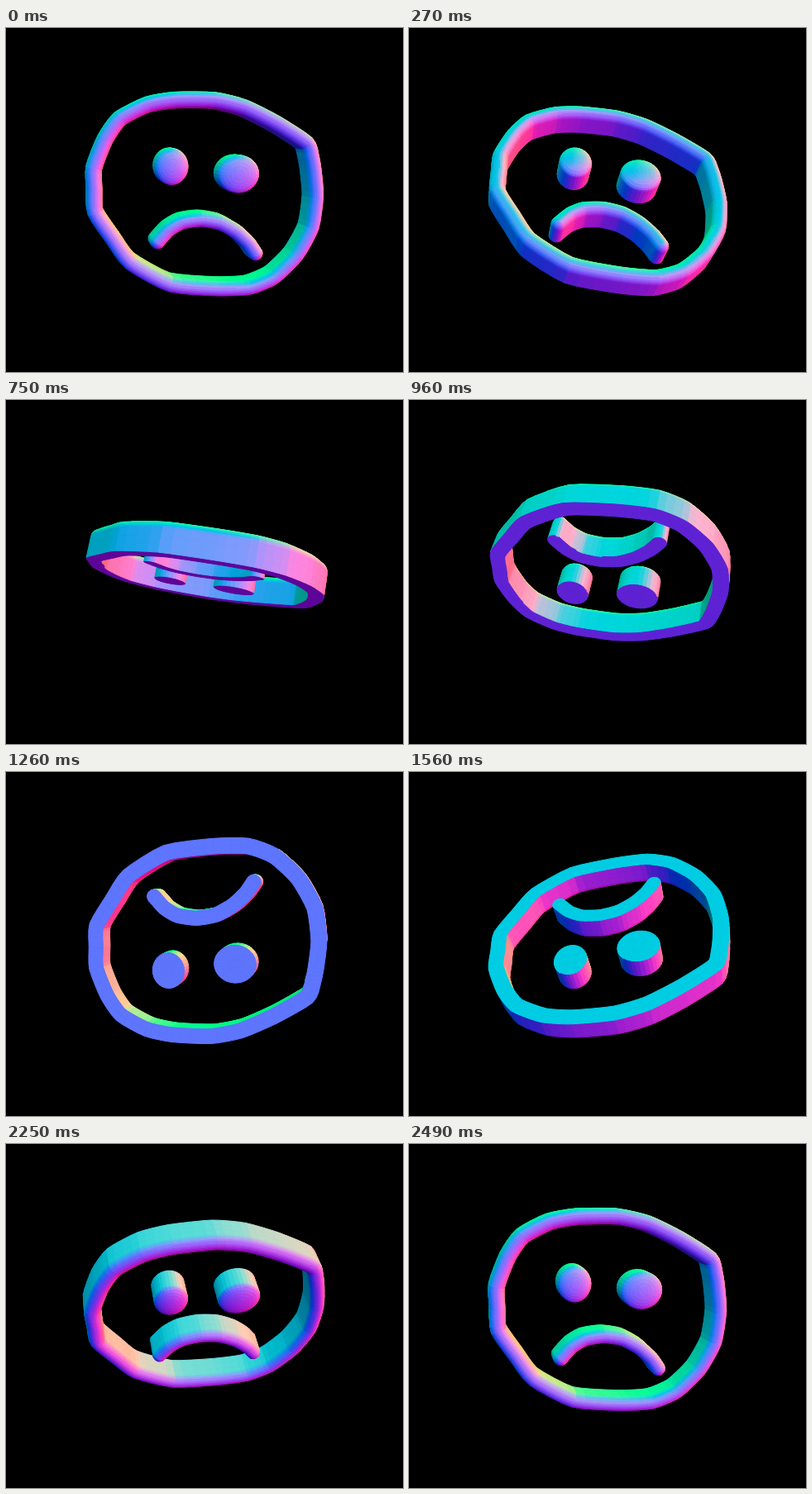
Recreate the animation shown at these times as an HTML page with a canvas. Size 480 by 416 pixels, loop 2.52 s.

```html
<!DOCTYPE html>
<html>
<head>
<meta charset="utf-8">
<style>
html, body { margin: 0; height: 100%; overflow: hidden; background: #000; }
canvas { display: block; }
</style>
</head>
<body>
<canvas id="stage" width="480" height="416"></canvas>
<script>
const ctx = document.getElementById('stage').getContext('2d');
const LOOP = 2520, STEP = 30;
const CENTER_X = 241, CENTER_Y = 203, CAMERA = 850;
const FRONT = 20, BACK = -16, BEVEL = 9, YAW = Math.PI / 18, START = -5;
const clamp = v => Math.max(0, Math.min(1, v));

// Stage position of the front face -> flat model coordinates, y up
function toModel([px, py]) {
  const u = px - 243, scale = 1.003 + 0.0002 * u;
  return [u * scale, (201 - py) * scale];
}

const headPoints = [
  [107, 165], [121, 131], [139, 107], [172, 91], [205, 86], [252, 87], [288, 96],
  [326, 115], [363, 139], [369, 156], [372, 172], [375, 203], [370, 240], [352, 273],
  [325, 299], [295, 311], [255, 312], [198, 306], [150, 279], [129, 250], [108, 218], [107, 191]
].map(toModel);
const mouthPoints = [
  [183, 254], [196, 240], [212, 231], [235, 228], [258, 232], [278, 243], [293, 257], [302, 270]
].map(toModel);

// Smooth path through the points, with a gentle tension
function smooth(points, closed, parts = 4) {
  const n = points.length, path = [];
  const at = i => points[closed ? (i + n) % n : Math.max(0, Math.min(n - 1, i))];
  for (let i = 0; i < (closed ? n : n - 1); i++) {
    for (let k = 0; k < parts; k++) {
      const t = k / parts, t2 = t * t, t3 = t2 * t;
      path.push([0, 1].map(c => {
        const a = at(i)[c], b = at(i + 1)[c];
        const ma = 0.3 * (b - at(i - 1)[c]), mb = 0.3 * (at(i + 2)[c] - a);
        return (2 * t3 - 3 * t2 + 1) * a + (t3 - 2 * t2 + t) * ma
          + (3 * t2 - 2 * t3) * b + (t3 - t2) * mb;
      }));
    }
  }
  if (!closed) path.push(points[n - 1]);
  return path;
}

// Each station is a center point plus a sideways vector, left of travel
function stations(path, closed, width) {
  const n = path.length;
  return path.map(([x, y], i) => {
    const a = path[closed ? (i + n - 1) % n : Math.max(0, i - 1)];
    const b = path[closed ? (i + 1) % n : Math.min(n - 1, i + 1)];
    const dx = b[0] - a[0], dy = b[1] - a[1], k = width / Math.hypot(dx, dy);
    return [x, y, -dy * k, dx * k];
  });
}

function roundEnd([x, y, nx, ny]) {
  return Array.from({ length: 9 }, (_, i) => {
    const a = -Math.PI * (i + 1) / 10, c = Math.cos(a), s = Math.sin(a);
    return [x, y, nx * c - ny * s, nx * s + ny * c];
  });
}

function eye(px, py, rx, ry) {
  const [x, y] = toModel([px, py]);
  return Array.from({ length: 32 }, (_, i) => {
    const a = -i * Math.PI / 16;
    return [x, y, rx * Math.cos(a), ry * Math.sin(a)];
  });
}

// Half profile from the flat back, up the wall and over the rounded front
const profile = [[0, BACK], [1, BACK]];
const shoulder = FRONT - BEVEL;
for (let i = 1; i < 3; i++) profile.push([1, BACK + (shoulder - BACK) * i / 3]);
for (let i = 0; i <= 7; i++) {
  const a = i * Math.PI / 14;
  profile.push([Math.cos(a), shoulder + BEVEL * Math.sin(a)]);
}

const sweep = list => list.map(([x, y, nx, ny]) =>
  profile.map(([f, z]) => [x + nx * f, y + ny * f, z]));

const headPath = smooth(headPoints, true);
const mouthPath = smooth(mouthPoints, false);
const upper = stations(mouthPath, false, 8.5);
const lower = stations(mouthPath.slice().reverse(), false, 8.5);
const surfaces = [
  stations(headPath, true, 9),
  stations(headPath.slice().reverse(), true, 9),
  [...upper, ...roundEnd(upper[upper.length - 1]), ...lower, ...roundEnd(lower[lower.length - 1])],
  eye(200.5, 164.5, 19.5, 21.5),
  eye(281, 174.5, 25, 22.5)
].map(sweep);

function colorOf([x, y, z], degrees) {
  const fade = 1 - 0.7 * Math.exp(-(((degrees - 316) / 25) ** 2));
  const cut = fade * clamp((y - 0.25) / 0.3) * Math.max(0, 1 - 1.5 * Math.abs(x));
  const channel = v => Math.round(255 * clamp(v));
  return `rgb(${channel((1 + 1.5 * x - cut) / 2)},${channel((1 + y) / 2)},${channel((1 + z) / 2)})`;
}

const minus = (a, b) => [a[0] - b[0], a[1] - b[1], a[2] - b[2]];
const cross = (a, b) => [
  a[1] * b[2] - a[2] * b[1], a[2] * b[0] - a[0] * b[2], a[0] * b[1] - a[1] * b[0]
];

function draw(time) {
  const degrees = START + 360 * time / LOOP, tilt = degrees * Math.PI / 180;
  const cy = Math.cos(YAW), sy = Math.sin(YAW), ct = Math.cos(tilt), st = Math.sin(tilt);
  const turn = ([x, y, z]) => {
    const depth = z * cy - x * sy;
    return [x * cy + z * sy, y * ct + depth * st, depth * ct - y * st];
  };

  const faces = [];
  for (const surface of surfaces) {
    const rows = surface.map(row => row.map(turn));
    rows.forEach((row, i) => {
      const next = rows[(i + 1) % rows.length];
      for (let j = 0; j + 1 < row.length; j++) {
        const quad = [row[j], next[j], next[j + 1], row[j + 1]];
        const n = cross(minus(quad[3], quad[1]), minus(quad[2], quad[0]));
        const size = Math.hypot(...n);
        const p = quad[0];
        if (size < 1e-6 || n[2] * (CAMERA - p[2]) - n[0] * p[0] - n[1] * p[1] <= 0) continue;
        const mid = [0, 1, 2].map(c => quad.reduce((sum, q) => sum + q[c], 0) / 4);
        faces.push({
          quad,
          distance: Math.hypot(mid[0], mid[1], CAMERA - mid[2]),
          color: colorOf(n.map(v => v / size), degrees)
        });
      }
    });
  }
  faces.sort((a, b) => b.distance - a.distance);

  ctx.fillStyle = '#000';
  ctx.fillRect(0, 0, 480, 416);
  ctx.lineWidth = 1;
  ctx.lineJoin = 'round';
  for (const { quad, color } of faces) {
    ctx.beginPath();
    for (const [x, y, z] of quad) {
      const k = CAMERA / (CAMERA - z);
      ctx.lineTo(CENTER_X + x * k, CENTER_Y - y * k);
    }
    ctx.closePath();
    ctx.fillStyle = ctx.strokeStyle = color;
    ctx.fill();
    ctx.stroke();
  }
}

const begin = performance.now();
function tick() {
  const time = (performance.now() - begin) % LOOP;
  draw(Math.floor(time / STEP) * STEP);
  requestAnimationFrame(tick);
}
tick();
</script>
</body>
</html>
```
